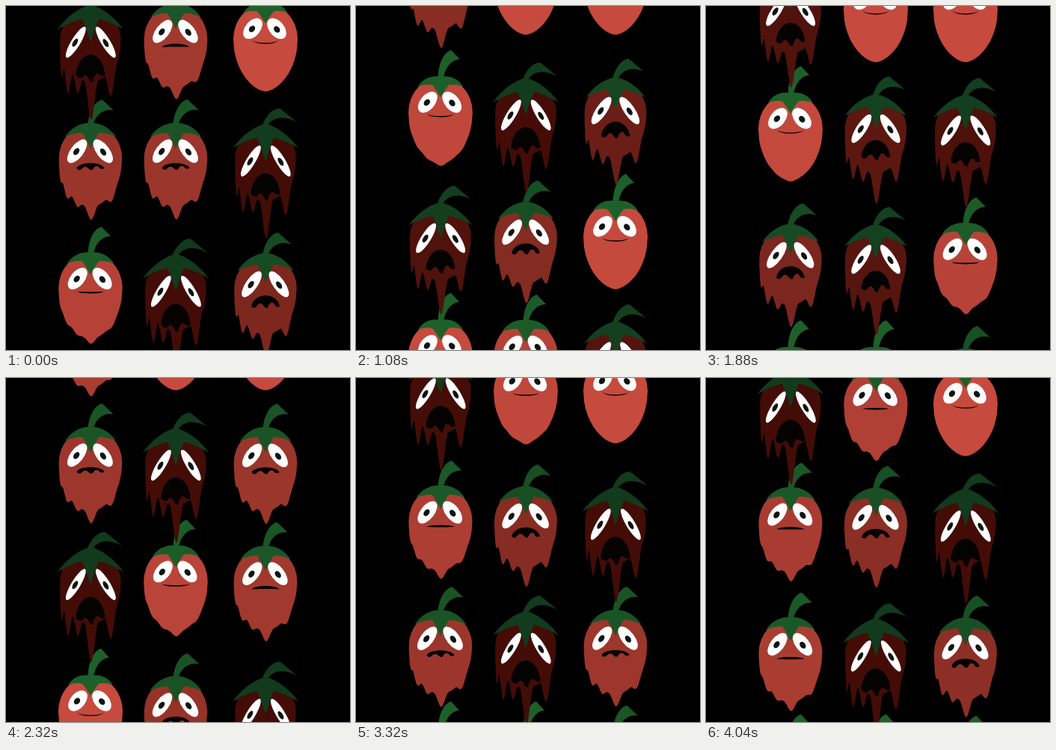
Animation, 460 px wide and 460 px high, one loop 4.08 s. Source, as an HTML page:

```html
<!DOCTYPE html>
<html>
<head>
<meta charset="utf-8">
<style>
  html, body { margin: 0; width: 100%; height: 100%; overflow: hidden; background: #000; }
  svg { display: block; width: 100vw; height: 100vh; }
</style>
</head>
<body>
<svg id="stage" viewBox="0 0 460 460"></svg>
<script>
const NS = 'http://www.w3.org/2000/svg';
const STEP_MS = 40, STEPS = 102;
const FALL_PER_STEP = 9.79, ENTRY_Y = -75;
const FIRST_LAUNCH = -44.5, LAUNCH_EVERY = 17;

// Each column melts its peppers twice on the way down.
const COLUMNS = [{ x: 113, peak: 20 }, { x: 227, peak: 112 }, { x: 347, peak: 176 }];
const PEAK_GAP = 246, PEAK_REACH = 125, PEAK_MELT = .9;

const HALF_WIDTH = 43, WAIST_Y = 14, BELLY = 70;
const DRIPS = [
  { x: -41, length: 36, reach: 4.5 }, { x: -32, length: 37, reach: 7 }, { x: -18, length: 24, reach: 7 },
  { x: 1, length: 57, reach: 10 }, { x: 29, length: 37, reach: 9 }
];

// Fresh and melted outlines
const STEM = [
  [[-3, -31], [-4, -48], [3, -67], [14, -70], [25, -58], [14, -57], [6, -46], [4, -31]],
  [[-5, -28], [1, -42], [10, -50], [20, -50], [45, -30], [26, -42], [9, -40], [2, -28]]
];
const CALYX = [ // crown, shoulder, tip, notch, middle point; mirrored on the right
  [[0, -34], [20, -37], [30, -21], [11, -23], [0, -7]],
  [[0, -32], [26, -23], [46, 4], [11, -12], [0, 22]]
];
const SKIN = [[198, 74, 62], [68, 12, 7]];
const LEAF = [[29, 96, 42], [17, 54, 28]];

const mix = (a, b, k) => Array.isArray(a) ? a.map((v, i) => mix(v, b[i], k)) : a + (b - a) * k;
const blend = (pair, k) => mix(pair[0], pair[1], k);
const rgb = (pair, k) => `rgb(${blend(pair, k).map(Math.round)})`;
const smooth = k => k * k * (3 - 2 * k);

function pulse(distance) {
  const d = Math.abs(distance) / PEAK_REACH;
  return d < 1 ? Math.cos(d * Math.PI / 2) ** 2 : 0;
}

function meltAt(column, y) {
  const { peak } = COLUMNS[column];
  return PEAK_MELT * Math.max(pulse(y - peak), pulse(y - peak - PEAK_GAP));
}

function bottomEdge(x, m) {
  const egg = WAIST_Y + BELLY * Math.sqrt(1 - (Math.abs(x) / HALF_WIDTH) ** (5 / 3));
  let drop = -14 * Math.max(0, 1 - (x / 38) ** 2);
  for (const d of DRIPS) drop += d.length * smooth(Math.max(0, 1 - Math.abs(x - d.x) / d.reach));
  return egg + m * drop;
}

function bodyPath(m) {
  const squeeze = 1 - .06 * m, w = HALF_WIDTH * squeeze;
  let d = `M${-w},${WAIST_Y}A${w} ${47 - 8 * m} 0 0 1 ${w},${WAIST_Y}`;
  for (let x = HALF_WIDTH; x >= -HALF_WIDTH; x--)
    d += `L${(x * squeeze).toFixed(1)},${bottomEdge(x, m).toFixed(1)}`;
  return d + 'Z';
}

function stemPath(m) {
  const p = blend(STEM, m);
  return `M${p[0]}C${p[1]} ${p[2]} ${p[3]}L${p[4]}C${p[5]} ${p[6]} ${p[7]}Z`;
}

function calyxPath(m) {
  const [crown, shoulder, tip, notch, middle] = blend(CALYX, m);
  const flip = ([x, y]) => [-x, y];
  const inner = [(tip[0] + notch[0]) / 2, (tip[1] + notch[1]) / 2 - 3];
  const side = [notch[0] * .4, (notch[1] + middle[1]) / 2];
  return `M${crown}Q${shoulder} ${tip}Q${inner} ${notch}Q${side} ${middle}` +
    `Q${flip(side)} ${flip(notch)}Q${flip(inner)} ${flip(tip)}Q${flip(shoulder)} ${crown}Z`;
}

function mouthPath(m) {
  const w = 18 + 2 * m;
  const corner = 15 + 55 * m ** 1.2;
  const upper = 19 + 20 * m * m;
  const lower = upper + 1.4 + 30 * m ** 1.7;
  const control = y => (y - corner / 4) / .75;
  const lid = `M${-w},${corner}C${-w * .8},${control(upper)} ${w * .8},${control(upper)} ${w},${corner}`;
  if (m < .25) return `${lid}C${w * .8},${control(lower)} ${-w * .8},${control(lower)} ${-w},${corner}Z`;
  const tooth = 12 * m;
  return `${lid}Q${w - 5},${corner + 3} 11,${lower}Q6,${lower - 3} 3,${lower + tooth}` +
    `Q0,${lower + tooth + 2} -3,${lower + tooth / 2}Q-7,${lower - 2} -11,${lower + tooth / 2}` +
    `Q-15,${corner + 5} ${-w},${corner}Z`;
}

function set(el, attrs) {
  for (const k in attrs) el.setAttribute(k, attrs[k]);
}

function add(parent, tag, attrs = {}) {
  const el = document.createElementNS(NS, tag);
  set(el, attrs);
  return parent.appendChild(el);
}

function makePepper(order, column) {
  const g = add(stage, 'g');
  const part = (tag, fill) => add(g, tag, { fill });
  // Every third pepper trails slightly.
  const late = order % 3 === 1 ? .5 : -.25;
  return {
    column, g, launch: FIRST_LAUNCH + LAUNCH_EVERY * order + late,
    body: part('path'), mouth: part('path', '#050202'), stem: part('path'), calyx: part('path'),
    eyes: [-1, 1].map(side => ({
      side, white: part('ellipse', '#fff'), pupil: part('ellipse', '#0d1510')
    }))
  };
}

function drawPepper(p, y) {
  const m = meltAt(p.column, y);
  const leaf = rgb(LEAF, m);
  set(p.g, { transform: `translate(${COLUMNS[p.column].x} ${y})` });
  set(p.body, { d: bodyPath(m), fill: rgb(SKIN, Math.min(1, 1.15 * m)) });
  set(p.mouth, { d: mouthPath(m) });
  set(p.stem, { d: stemPath(m), fill: leaf });
  set(p.calyx, { d: calyxPath(m), fill: leaf });

  const sag = 21 * m ** 1.2;
  for (const { side, white, pupil } of p.eyes) {
    const x = side < 0 ? -17 - 3 * m : 15 + 6 * m;
    const transform = `translate(${x} ${sag}) rotate(${-side * (40 - 10 * m)})`;
    set(white, { rx: 10 - 4.5 * m, ry: 16 + 9 * m, transform });
    set(pupil, { cx: -.5, cy: 1, rx: 3.7 - m, ry: 4.8 + 1.5 * m, transform });
  }
}

const stage = document.getElementById('stage');
const peppers = [];
// Later peppers are higher up and drip over the stems below them.
for (let order = -1; order <= 9; order++)
  COLUMNS.forEach((_, column) => peppers.push(makePepper(order, column)));

function render(ms) {
  const step = Math.floor(ms / STEP_MS) % STEPS;
  for (const p of peppers) {
    const y = ENTRY_Y + FALL_PER_STEP * (step - p.launch);
    const visible = y > -130 && y < 540;
    set(p.g, { visibility: visible ? 'visible' : 'hidden' });
    if (visible) drawPepper(p, y);
  }
}

const begin = performance.now();
function tick() {
  render(performance.now() - begin);
  requestAnimationFrame(tick);
}
tick();
</script>
</body>
</html>
```
